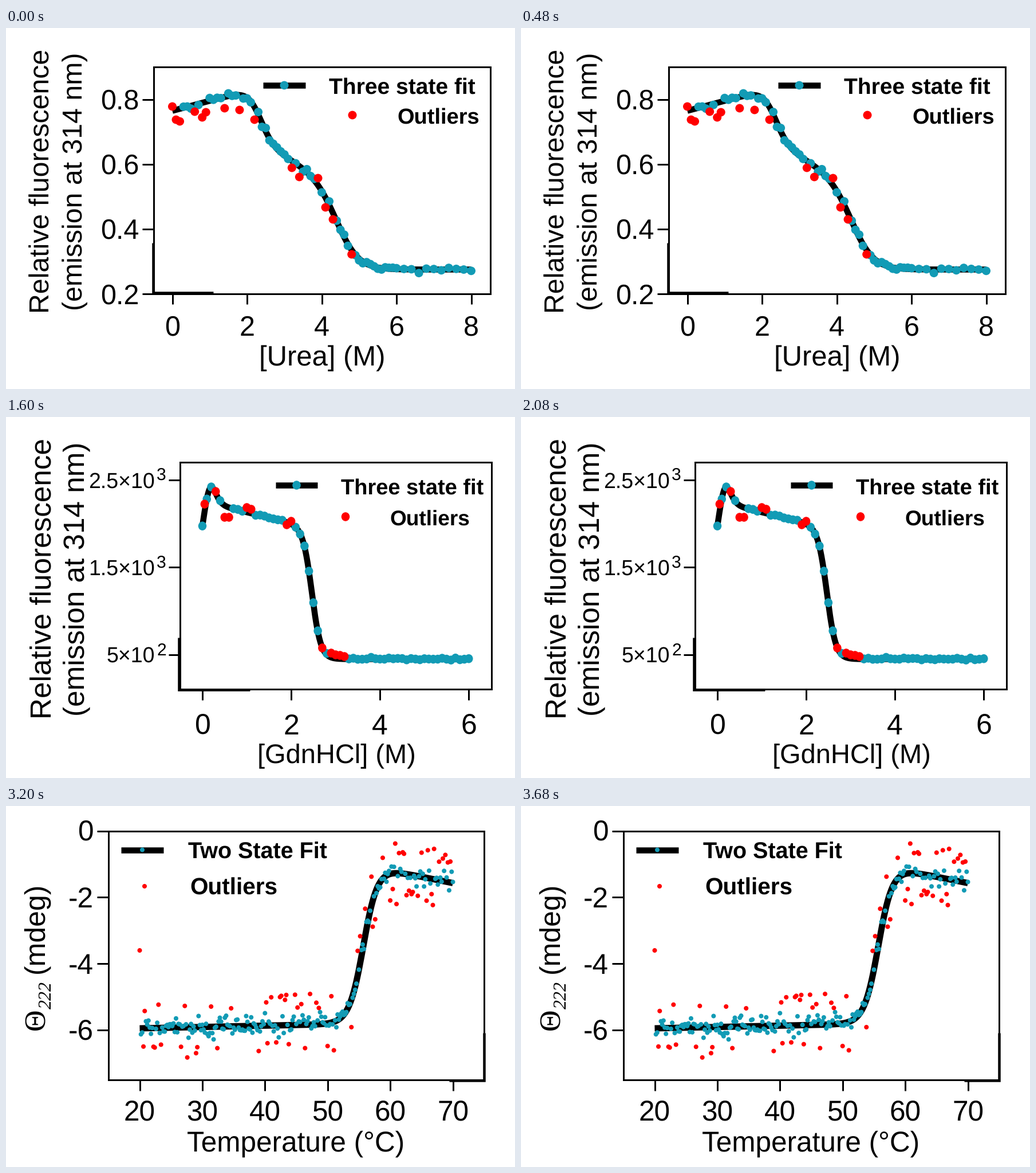
Write a matplotlib script that moves like this. It is 889x630 px and loops after 4000 ms.

```python
import matplotlib.pyplot as plt
import numpy as np
from matplotlib.animation import FuncAnimation
from matplotlib.collections import EllipseCollection

W, H, DPI = 889, 630, 64
PT = 72 / DPI  # points per pixel
TEAL, RED = "#129bb5", "#ff0000"
SANS, SERIF = "Liberation Sans", "Liberation Serif"

plt.rcParams["text.hinting"] = "none"
fig = plt.figure(figsize=(W / DPI, H / DPI), dpi=DPI, facecolor="white")
ax = fig.add_axes([0, 0, 1, 1])


def text(x, y, s, size, ha="center", font=SANS, **kw):
    ax.text(x, y, s, fontsize=size * PT, ha=ha, va="baseline",
            family=font, color="black", zorder=5, **kw)


def vtext(x, y, s, size, font=SANS, **kw):
    text(x, y, s, size, font=font, rotation=90, rotation_mode="anchor", **kw)


def line(xs, ys, width, join="miter"):
    ax.plot(xs, ys, color="black", lw=width * PT, solid_capstyle="butt",
            solid_joinstyle=join, zorder=2)


def dots(xs, ys, color, size):
    ax.add_collection(EllipseCollection(
        size[0], size[1], 0, units="xy", offsets=np.column_stack([xs, ys]),
        offset_transform=ax.transData, facecolors=color,
        edgecolors="none", zorder=4))


def frame(left, top, right, bottom):
    line([left, right, right, left, left, right],
         [top, top, bottom, bottom, top, top], 3)


def x_axis(bottom, start, step, labels, base, size):
    for i, label in enumerate(labels.split()):
        x = start + i * step
        line([x, x], [bottom, bottom + 19], 3)
        text(x, base, label, size)


def y_axis(left, start, step, labels, right, size):
    for i, label in enumerate(labels.split()):
        y = start + i * step
        line([left - 20, left], [y, y], 3)
        mantissa, _, power = label.partition("^")
        text(right, y + 0.35 * size, mantissa, size, ha="right")
        if power:
            text(right + 20, y + 1, power, 0.8 * size, ha="right")


def fluorescence_label(x1, x2, y, size):
    vtext(x1, y, "Relative fluorescence", size)
    vtext(x2, y + 1, "(emission at 314 nm)", size)


def theta_label(x, y, y_sub, sub, sub_size, y_unit, **sub_style):
    vtext(x, y, "Θ", 52, SERIF)
    vtext(x + 13, y_sub, sub, sub_size, **sub_style)
    vtext(x, y_unit, "(mdeg)", 50)


def legend(bar, bar_y, dot, fit_text, out_text, sizes, name="Three state fit"):
    line(bar, [bar_y] * 2, 10.5)
    dots([sum(bar) / 2], [bar_y], TEAL, dot)
    text(*fit_text, name, sizes[0], weight="bold")
    text(*out_text, "Outliers", sizes[1], weight="bold")


def unfolding(lines, steps):
    """Baselines (intercept, slope) joined by sigmoid steps (middle, width)."""
    def fit(x):
        bases = [a + b * x for a, b in lines]
        y = bases[0]
        for low, high, (mid, width) in zip(bases, bases[1:], steps):
            y = y + (high - low) / (1 + np.exp((mid - x) / width))
        return y
    return fit


def titration(fit, origin, scale, grid, outliers, noise, dot, seed):
    """Fit line, scattered readings on the grid (tenths of M), and outliers."""
    x = np.linspace(0, grid[-1] / 10, 500)
    line(origin + scale * x, fit(x), 10.5, "round")
    used = np.setdiff1d(grid, list(outliers)) / 10
    scatter = np.random.default_rng(seed).normal(0, noise, used.size)
    dots(origin + scale * used, fit(used) + scatter, TEAL, dot)
    out = np.array(list(outliers)) / 10
    dots(origin + scale * out, list(outliers.values()), RED, dot)


def urea_fluorescence():
    frame(257.5, 67.5, 845.5, 463.5)
    line([256.5, 256.5, 362], [375, 461.5, 461.5], 4.5)
    x_axis(463, 290.5, 130.5, "0 2 4 6 8", 537, 48.5)
    y_axis(258, 124.5, 113.2, "0.8 0.6 0.4 0.2", 233, 48.5)
    text(552, 589, "[Urea] (M)", 49)
    fluorescence_label(75.5, 133, 267, 48.2)
    fit = unfolding([(144.5, -17.5), (134, 30), (421.5, 0)],
                    [(2.32, 0.18), (4.45, 0.3)])
    outliers = {0: 137, 1: 160, 2: 163, 6: 146, 8: 156, 9: 147, 14: 140,
                18: 143, 22: 160, 32: 244, 34: 260, 39: 262, 41: 313,
                43: 334, 48: 395}
    dot = (15, 14.8)
    titration(fit, 290.5, 65.25, [*range(60), *range(60, 81, 2)],
              outliers, 3, dot, 4)
    dots([605], [152], RED, dot)
    legend((449, 523), 100, dot, (692, 115), (755, 167), (39, 38))


def urea_ellipticity():
    frame(153.5, 19.5, 872, 478)
    line([154, 154, 274], [105, 18.5, 18.5], 4.5)
    x_axis(478, 193.5, 159.6, "0 2 4 6 8", 554, 52)
    y_axis(153, 96.5, 152.8, "2 0 -2", 124, 52)
    text(514, 609, "[Urea] (M)", 53)
    theta_label(48.5, 371, 312, "221.8", 34.5, 186, font=SERIF)
    fit = unfolding([(426.5, 0), (257, 20.5), (393, -42)],
                    [(2.1, 0.14), (4.22, 0.3)])
    outliers = {1: 392, 9: 444, 13: 408, 29: 281, 31: 344, 33: 289, 45: 262,
                53: 237, 59: 186, 62: 157, 66: 97}
    dot = (16, 14.8)
    titration(fit, 193.5, 79.8, [0, *range(1, 60, 2), *range(60, 81, 2)],
              outliers, 3, dot, 2)
    dots([612], [388], RED, dot)
    legend((455, 536), 447.5, dot, (719.5, 463), (775, 404), (42, 41))


def gdn_fluorescence():
    frame(303.5, 79, 847.5, 475)
    line([302, 302, 426], [385, 475.5, 475.5], 4.5)
    x_axis(475, 343, 155.1, "0 2 4 6", 554, 50)
    y_axis(304, 110, 152.4, "2.5×10^3 1.5×10^3 5×10^2", 260, 37.5)
    text(577, 603, "[GdnHCl] (M)", 47)
    fluorescence_label(79.5, 137.5, 282, 51.2)
    fit = unfolding([(193, -520), (147.7, 18.5), (422.5, 0)],
                    [(0.19, 0.07), (2.468, 0.1)])
    outliers = {0.5: 152, 3: 130, 5: 175, 6: 175, 10: 158, 11: 161, 19: 188,
                20: 182, 27: 403, 29: 412, 30: 415, 31: 416, 32: 418}
    dot = (14.5, 15.5)
    titration(fit, 343, 77.55, range(61), outliers, 1.2, dot, 7)
    dots([593], [174], RED, dot)
    legend((471, 544), 119, dot, (709.5, 135), (740.5, 190), (38, 37))


def gdn_ellipticity():
    frame(152, 21.5, 869, 478)
    line([152.5, 152.5, 279], [108, 20.5, 20.5], 4.5)
    x_axis(478, 203.5, 204.7, "0 2 4 6", 554, 52)
    y_axis(152, 105, 166, "-1 -3 -5", 124, 52)
    text(512, 608, "[GdnHCl] (M)", 52)
    theta_label(48.5, 368, 317, "219", 39, 194.5)
    fit = unfolding([(350, -120), (392, 18.5), (317, -41)],
                    [(0.443, 0.068), (2.3, 0.155)])
    outliers = {3: 360, 7: 369, 9: 430, 10: 390, 12: 454, 24: 246, 26: 210,
                29: 297, 31: 254, 34: 152, 39: 133, 40: 113, 44: 89, 47: 157,
                48: 100, 49: 147, 51: 155, 53: 137, 55: 70}
    dot = (16, 14.8)
    titration(fit, 203.5, 102.33, range(61), outliers, 4.5, dot, 3)
    dots([612], [384.5], RED, (8, 8))
    legend((451, 531), 440.5, dot, (715.5, 456), (774.5, 400), (42, 41.3))


def melting():
    frame(179, 43.5, 835, 478)
    line([774, 835, 835], [478.5, 478.5, 396], 4.5)
    x_axis(478, 233.5, 109.4, "20 30 40 50 60 70", 550, 49.5)
    y_axis(179, 43.5, 115.9, "0 -2 -4 -6", 153, 49.5)
    text(506.5, 603, "Temperature (°C)", 49.5)
    theta_label(66, 372, 330, "222", 32, 213, font=SERIF, style="italic")
    fit = unfolding([(392.6, -0.23), (-19.5, 2.2)], [(55.75, 1.13)])

    def to_px(t):
        return 233.5 + 10.94 * (t - 20)

    t = np.linspace(20, 70, 251)
    line(to_px(t), fit(t), 11, "round")
    rng = np.random.default_rng(12)
    steep = np.exp(-((t - 55) / 3) ** 2)
    noise = np.clip(rng.normal(0, 10, t.size), -22, 22) * (1 - 0.5 * steep)
    far = rng.choice([-1, 1], t.size) * rng.uniform(26, 54, t.size)
    stray = rng.random(t.size) < np.where(t > 57, 0.36, 0.22)
    stray[0], far[0] = True, -136
    x, y = to_px(t), fit(t) + np.where(stray, far, noise)
    dots(x[~stray], y[~stray], TEAL, (8, 8))
    dots(x[stray], y[stray], RED, (8, 8))
    dots([242], [140], RED, (8, 8))
    legend((201, 275), 76.5, (8, 8), (439.5, 92), (398, 155), (39.5, 40.5),
           "Two State Fit")


PANELS = [urea_fluorescence, urea_ellipticity, gdn_fluorescence,
          gdn_ellipticity, melting]


def draw(i):
    ax.clear()
    ax.set_axis_off()
    ax.set_xlim(0, W)
    ax.set_ylim(H, 0)
    ax.set_autoscale_on(False)
    PANELS[i]()
    return []


anim = FuncAnimation(fig, draw, frames=len(PANELS), interval=800,
                     repeat=True, repeat_delay=0, blit=False)
plt.show()
```
